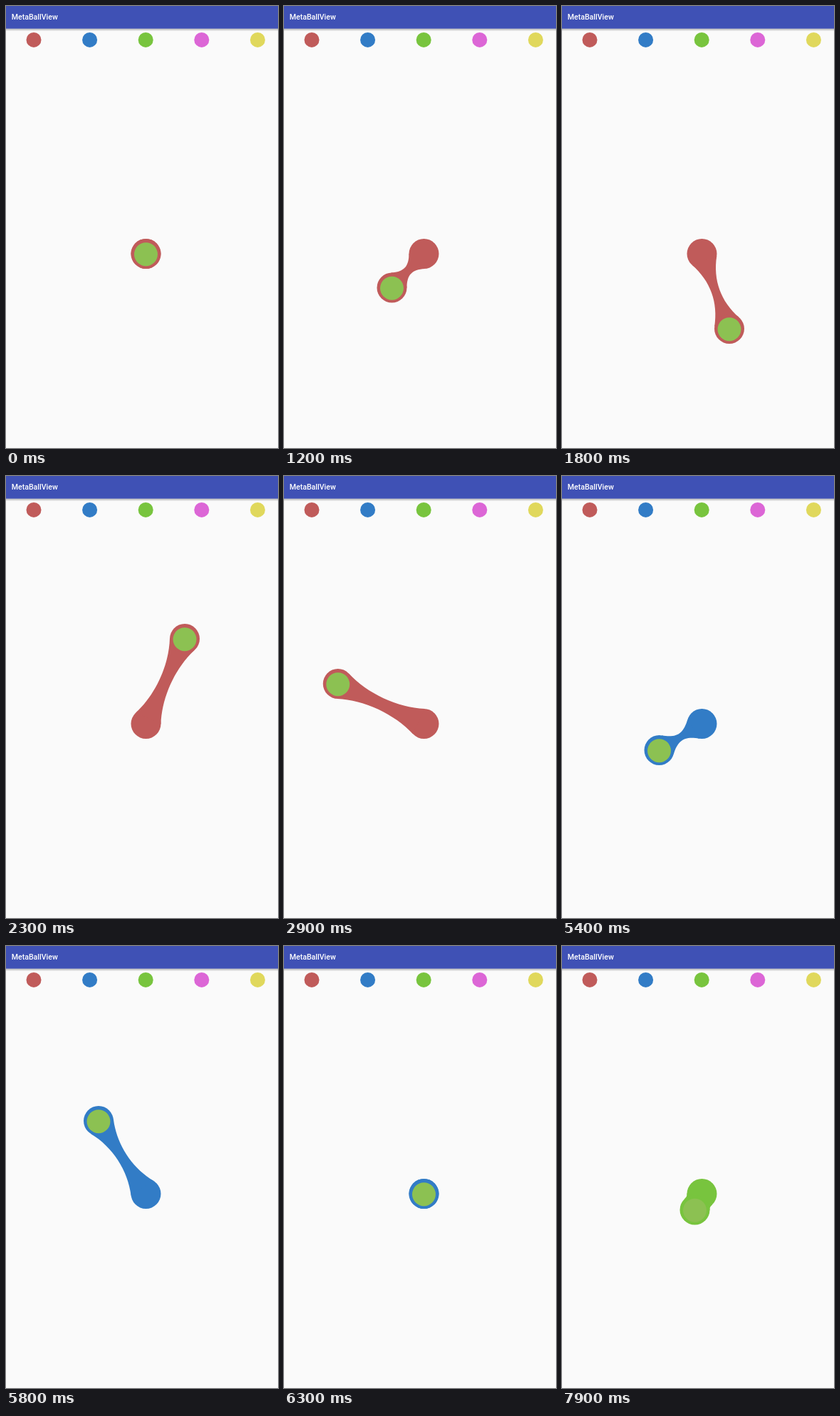
An HTML page that plays this animation: 382 by 619 pixels, repeating every 8 s.

```html
<!DOCTYPE html>
<html lang="en">
<head>
<meta charset="utf-8">
<title>MetaBallView</title>
<style>
html, body { margin: 0; width: 100%; height: 100%; overflow: hidden; background: #fafafa; }
svg { display: block; width: 100vw; height: 100vh; }
text { font: 500 10.6px Roboto, sans-serif; fill: #fff; }
</style>
</head>
<body>
<svg viewBox="0 0 382 619">
  <defs>
    <linearGradient id="shade" x1="0" y1="0" x2="0" y2="1">
      <stop offset="0" stop-color="#000" stop-opacity=".3"/>
      <stop offset="1" stop-color="#000" stop-opacity="0"/>
    </linearGradient>
  </defs>
  <rect width="382" height="619" fill="#fafafa"/>
  <rect y="31.5" width="382" height="4" fill="url(#shade)"/>
  <rect width="382" height="31.7" fill="#3f51b5"/>
  <text x="7.7" y="19.2">MetaBallView</text>
  <g id="swatches"></g>
  <g id="blob">
    <circle cx="196.5" cy="347" r="21"/>
    <path id="neck"/>
    <circle id="ball" r="21"/>
  </g>
  <circle id="icon" r="16.5" fill="#8cc152"/>
</svg>
<script>
const $ = id => document.getElementById(id);
const LOOP = 8000, STEP = 100, R = 21, HOME = [196.5, 347];
const COLORS = ['#c05b5a', '#327cc6', '#78c43e', '#dc66d6', '#e0d85c'];

// Each drag: [time, x, y] along the finger's path
const DRAGS = [
  [[600, ...HOME], [1200, 151.5, 394.5], [1300, 146, 420], [1400, 164, 465],
   [1500, 181, 474], [1600, 203, 473], [1700, 203, 473], [1800, 235, 452],
   [2000, 268, 352], [2300, 251, 228], [2500, 188, 221], [2600, 148, 226],
   [2800, 90, 262], [3000, 75, 330], [3200, 125, 446], [3400, ...HOME]],
  [[5100, ...HOME], [5400, 136.5, 384], [5500, 104, 376], [5600, 80, 345],
   [5700, 87, 290], [5800, 130, 245], [5900, 205, 245], [6000, 268, 293],
   [6100, 274, 335], [6200, 238, 351], [6300, ...HOME]],
  [[7700, ...HOME], [7900, 186.5, 369.5], [8000, 178, 389]]
];

COLORS.forEach((fill, i) => {
  const c = document.createElementNS('http://www.w3.org/2000/svg', 'circle');
  set(c, { cx: 39 + i * 78.6, cy: 47.4, r: 10.5, fill });
  $('swatches').append(c);
});

function set(el, attrs) {
  for (const k in attrs) el.setAttribute(k, attrs[k]);
}

// Smooth curve through the keys, at rest at both ends
function along(keys, t) {
  const i = keys.findIndex((k, n) => n && t <= k[0]) - 1;
  const a = keys[i], b = keys[i + 1], h = b[0] - a[0], u = (t - a[0]) / h;
  const slope = (n, d) => {
    const p = keys[n - 1], q = keys[n + 1];
    return p && q ? (q[d] - p[d]) / (q[0] - p[0]) : 0;
  };
  const s = u * u * (3 - 2 * u);
  return [1, 2].map(d => a[d] + (b[d] - a[d]) * s +
    h * u * (1 - u) * ((1 - u) * slope(i, d) - u * slope(i + 1, d)));
}

function position(t) {
  const keys = DRAGS.find(k => t >= k[0][0] && t <= k[k.length - 1][0]);
  return keys ? along(keys, t) : HOME;
}

const polar = ([x, y], a, r) => [x + r * Math.cos(a), y + r * Math.sin(a)];

function neckPath(p) {
  const dx = p[0] - HOME[0], dy = p[1] - HOME[1], d = Math.hypot(dx, dy);
  if (d < 1) return '';
  const axis = Math.atan2(dy, dx), v = Math.min(0.8, 0.3 + 0.0034 * d);
  const overlap = d < 2 * R ? Math.acos(d / (2 * R)) : 0;
  const open = overlap + (Math.PI / 2 - overlap) * v;
  const gap = Math.abs(d - 2 * R * Math.cos(open));
  const len = R * Math.min(v * 2.4, gap / (2 * R)) * Math.min(1, d / R);
  const side = s => {
    const a = axis + s * open, b = axis + Math.PI - s * open;
    const from = polar(HOME, a, R), to = polar(p, b, R);
    return [from, polar(from, a - s * Math.PI / 2, len),
            polar(to, b + s * Math.PI / 2, len), to];
  };
  const l = side(1), r = side(-1).reverse();
  return `M${l[0]}C${l.slice(1).join(' ')}L${r[0]}C${r.slice(1).join(' ')}Z`;
}

function draw(ms) {
  const t = Math.floor(ms % LOOP / STEP) * STEP;
  const p = position(t);
  set($('blob'), { fill: COLORS[t < 4500 ? 0 : t < 7300 ? 1 : 2] });
  set($('neck'), { d: neckPath(p) });
  set($('ball'), { cx: p[0], cy: p[1] });
  set($('icon'), { cx: p[0], cy: p[1] + 0.7 });
}

const start = performance.now();
function tick() {
  draw(performance.now() - start);
  requestAnimationFrame(tick);
}
tick();
</script>
</body>
</html>
```
